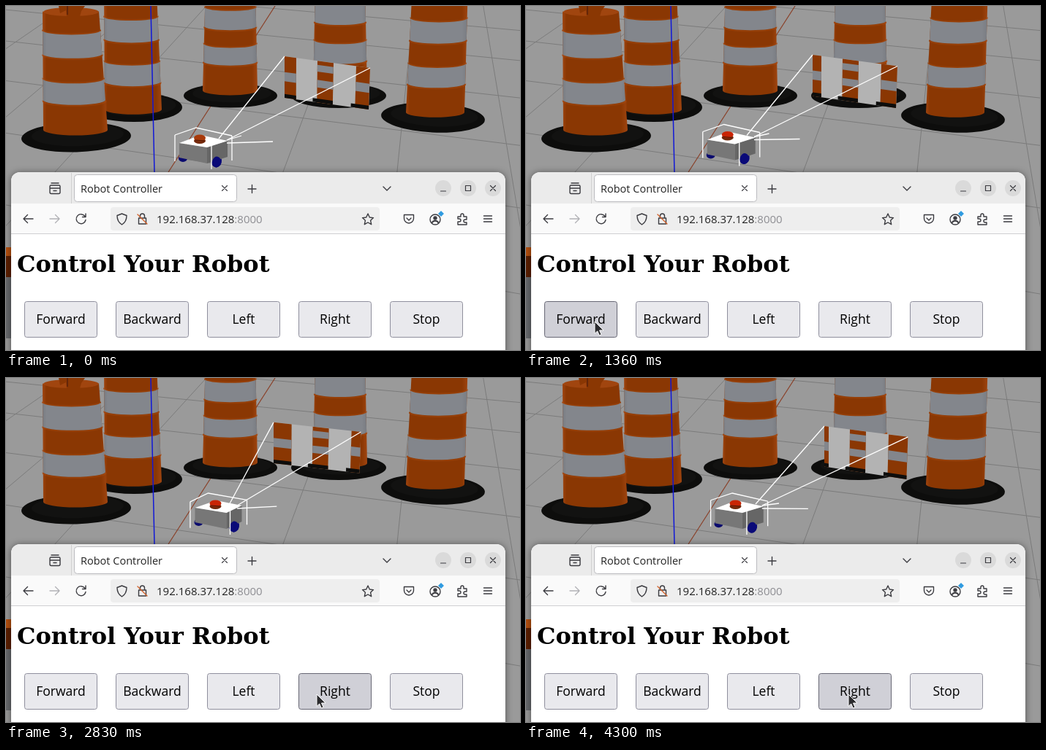
These frames come from a looping animation (703 px wide and 472 px high, 4.37 s). An HTML page with a canvas:

```html
<!DOCTYPE html>
<html lang="en">
<head>
<meta charset="utf-8">
<title>Robot Controller</title>
<style>
  html, body { margin: 0; width: 100%; height: 100%; overflow: hidden; background: #9a9a9a; }
  canvas, svg { position: absolute; left: 0; top: 0; }
  text { font-family: "Open Sans", "Noto Sans", sans-serif; fill: #222; }
  .title { font: bold 32px "DejaVu Serif", serif; fill: #000; }
  .window { filter: drop-shadow(0 1px 5px rgba(0, 0, 0, .5)); }
  .icon { fill: none; stroke: #3b3b40; stroke-width: 1.4; stroke-linecap: round; stroke-linejoin: round; }
  .btn rect { fill: #e9e9ed; stroke: #8f8f9d; }
  .btn.hover rect { fill: #d0d0d7; stroke: #676774; }
  .btn.press rect { fill: #b1b1b9; stroke: #484851; }
  .btn text { font-size: 17.5px; text-anchor: middle; fill: #000; }
</style>
</head>
<body>
<canvas id="ground" width="703" height="472"></canvas>
<canvas id="robot" width="703" height="472"></canvas>
<svg width="703" height="472" viewBox="0 0 703 472">
  <g class="window">
    <path d="M7 480V240a12 12 0 0 1 12-12H671a12 12 0 0 1 12 12V480z" fill="#fff"/>
  </g>
  <path d="M7 271V240a12 12 0 0 1 12-12H671a12 12 0 0 1 12 12V271z" fill="#ebebeb"/>
  <path d="M7 271H683V312H7z" fill="#fafafa"/>
  <path d="M7 312.5H683" stroke="#cfcfd2"/>
  <path d="M89.5 229V271" stroke="#cfcfcf"/>
  <rect x="93.5" y="231.5" width="222" height="37" rx="4" fill="#fff" stroke="#bcbcc0"/>
  <rect x="143" y="276" width="368" height="32" rx="4" fill="#eeeeee"/>
  <g fill="#dadada">
    <circle cx="598" cy="250" r="11"/><circle cx="632" cy="250" r="11"/><circle cx="666" cy="250" r="11"/>
  </g>
  <g class="icon">
    <path d="M62 243h10M60 247.500a1.500 1.500 0 0 1 1.500-1.500h11a1.500 1.500 0 0 1 1.500 1.500v8a2 2 0 0 1-2 2h-10a2 2 0 0 1-2-2zM60 250h14M65 253.500h4"/>
    <path d="M295.500 246.500l7 7m0-7l-7 7" stroke-width="1.1"/>
    <path d="M331 251h11m-5.500-5.500v11M516 248l5 5 5-5"/>
    <path d="M594.500 254h7M628.500 246.500h7v7h-7zM662.500 246.500l7 7m0-7l-7 7" stroke-width="1.2"/>
    <path d="M37 292H24m5.500-5.500L24 292l5.500 5.500"/>
    <path d="M60 292h13m-5.500-5.500L73 292l-5.500 5.500" stroke="#b2b2b6"/>
    <path d="M108 288.500a6.500 6.500 0 1 0 1 5M109 285v4.500h-4.500"/>
    <path d="M158.500 285l6.500 2.500c0 6-1.500 9.500-6.500 12.500-5-3-6.500-6.500-6.500-12.500z"/>
    <path d="M181.500 291h10v8h-10zM183.500 291v-3a3 3 0 0 1 6 0v3"/>
    <path d="M180 286l13 13" stroke="#d2622b"/>
    <path d="M495 285l2.300 5 5.200.6-3.900 3.700 1.100 5.400-4.700-2.700-4.700 2.700 1.100-5.400-3.900-3.700 5.200-.6z"/>
    <path d="M544.500 286.500h13v5a6.500 6.500 0 0 1-13 0zM548 291l3 3 3-3"/>
    <circle cx="587" cy="293" r="7"/>
    <path d="M583 297c1-3 7-3 8 0" stroke-width="2"/>
    <circle cx="587" cy="291" r="2" fill="#3b3b40"/>
    <path d="M618 289h4v-2a2 2 0 0 1 4 0v2h4v4h-2a2 2 0 0 0 0 4h2v3h-12v-4h2a2 2 0 0 0 0-4h-2z"/>
    <path d="M653.500 288h11m-11 4h11m-11 4h11"/>
  </g>
  <path d="M595 281l4 4-4 4-4-4z" fill="#309be0"/>
  <text x="102" y="256" font-size="14.5">Robot Controller</text>
  <text x="206" y="298" font-size="15">192.168.37.128<tspan fill="#8e8e93">:8000</tspan></text>
  <text class="title" x="15" y="365">Control Your Robot</text>
  <g id="buttons"></g>
  <path id="cursor" d="M0 0V16.500L3.700 13l2.600 6 2.800-1.200-2.600-5.800H12z" fill="#2b2b2e" stroke="#fff" stroke-width="1"/>
</svg>
<script>
const LOOP = 4370;
const WHITE = "#fff", ORANGE = "#8a3703", SILVER = "#83868c", BLACK = "#0d0d0c";
const ground = document.getElementById("ground").getContext("2d");
const ctx = document.getElementById("robot").getContext("2d");
const cursor = document.getElementById("cursor");

const mix = (a, b, k) => a + (b - a) * k;
const clamp = (v, lo, hi) => Math.min(hi, Math.max(lo, v));

// Linear track: rows of [time, ...values]
function track(rows, t) {
  if (t <= rows[0][0]) return rows[0].slice(1);
  for (let i = 1; i < rows.length; i++) {
    const a = rows[i - 1], b = rows[i];
    if (t < b[0]) return a.slice(1).map((v, j) => mix(v, b[j + 1], (t - a[0]) / (b[0] - a[0])));
  }
  return rows[rows.length - 1].slice(1);
}

function trace(c, pts) {
  c.beginPath();
  pts.forEach(([x, y], i) => i ? c.lineTo(x, y) : c.moveTo(x, y));
}
function poly(c, pts, fill) {
  trace(c, pts);
  c.closePath();
  c.fillStyle = fill;
  c.fill();
}
function line(c, pts, stroke, width = 1) {
  trace(c, pts);
  c.strokeStyle = stroke;
  c.lineWidth = width;
  c.stroke();
}
function oval(c, x, y, rx, ry, fill, turn = 0) {
  c.beginPath();
  c.ellipse(x, y, rx, ry, turn, 0, 7);
  c.fillStyle = fill;
  c.fill();
}

/* ---- static scene ---- */
function base(x, y, rx, ry, turn = 0) {
  oval(ground, x, y, rx, ry, BLACK, turn);
  oval(ground, x + 2, y - 3, rx * .84, ry * .74, "#121211", turn);
}

// Body from (l0..r0, y0) to (l1..r1, y1); bands are [top, bottom] pairs
function barrel(l0, r0, l1, r1, y0, y1, bands) {
  const arc = (y, grow, back) => {
    const k = (y - y0) / (y1 - y0);
    const l = mix(l0, l1, k) - grow, r = mix(r0, r1, k) + grow, rx = (r - l) / 2;
    const [from, to] = back ? [0, Math.PI] : [Math.PI, 0];
    ground.ellipse(l + rx, y, rx, rx * mix(.13, .17, k), 0, from, to, !back);
  };
  const ring = (a, b, grow, fill) => {
    ground.beginPath();
    arc(a, grow, false);
    arc(b, grow, true);
    ground.closePath();
    ground.fillStyle = fill;
    ground.fill();
  };
  const shade = (edge, mid) => {
    const g = ground.createLinearGradient(Math.min(l0, l1), 0, Math.max(r0, r1), 0);
    g.addColorStop(0, edge);
    g.addColorStop(.06, mid);
    g.addColorStop(.9, mid);
    g.addColorStop(1, edge);
    return g;
  };
  const lip = shade("#a84a12", "#963f08");
  ring(y0, y1, 0, shade("#a04510", ORANGE));
  for (const [a, b] of bands) {
    ring(a - 2, a, 1, lip);
    ring(b, b + 2, 1, lip);
    ring(a, b, 0, shade("#787b81", SILVER));
  }
}

function drawGround() {
  ground.fillStyle = "#9a9a9a";
  ground.fillRect(0, 0, 703, 472);
  // Two vanishing points shape the floor grid
  for (let k = -5; k < 7; k++) {
    const s = .269 * k - .64;
    if (k) line(ground, [[594 + s * 352, 0], [594 + s * 824, 472]], "#7b7b7b");
  }
  for (let i = 0; i < 9; i++) {
    const d = 1 / (.0034 - .0003 * i);
    line(ground, [[0, d - 352], [703, d * (1 + 703 / 3600) - 352]], "#7b7b7b");
  }
  line(ground, [[368, 0], [222, 228]], "#8a4028", 1.2);

  base(175, 139, 66, 20);
  barrel(134, 206, 135, 213, -20, 142, [[15, 45], [76, 104]]);
  line(ground, [[198, 0], [203, 228]], "#1018d8", 1.5);
  base(96, 180, 75, 20.5, -.03);
  barrel(50, 127, 51, 139, 7, 170, [[34, 66], [100, 129]]);
  oval(ground, 89, 8, 38, 6, "#a0450f");
  poly(ground, [[72, 0], [108, 0], [103, 7], [101, 14], [83, 14], [82, 6], [74, 10]], ORANGE);
  line(ground, [[84, 0], [84, 12]], "#64260a", 2);
  base(307, 123, 64, 16.5);
  barrel(273, 341, 269, 344, -30, 116, [[2, 28], [52, 76]]);
  base(455, 123, 65, 17);
  barrel(423, 491, 420, 494, -30, 117, [[-6, 21], [47, 74]]);
  base(584, 153, 71, 20.5, .05);
  barrel(556, 632, 547, 627, -30, 146, [[17, 46], [79, 106]]);

  // Slivers seen beside the window
  poly(ground, [[0, 331], [7, 331], [7, 343], [0, 343]], "#b5500f");
  poly(ground, [[0, 343], [7, 343], [7, 372], [0, 372]], "#5c1f02");
  poly(ground, [[0, 372], [7, 372], [7, 456], [0, 456]], "#686a6e");
}

/* ---- robot with its camera view ---- */
// go: 0..1 drive progress; yaw: sideways swing of the view in pixels
function drawView(go, yaw) {
  const tl = [381 + 22 * go + yaw, 69 - 4 * go - 6.2 * (1 - Math.exp(yaw / 33))];
  const tr = [498 + 20 * go + .88 * yaw, 85 - 5 * go + .163 * yaw];
  const br = [496 + 20 * go + .88 * yaw, 142 - 4 * go + .2 * yaw];
  const bl = [tl[0], 126 - 5 * go + .11 * yaw];
  const at = (u, v) => [0, 1].map(i => mix(mix(tl[i], tr[i], u), mix(bl[i], br[i], u), v));
  const patch = (u0, u1, v0, v1, fill) => {
    if (u1 > u0) poly(ctx, [at(u0, v0), at(u1, v0), at(u1, v1), at(u0, v1)], fill);
  };
  const width = tr[0] - tl[0];
  const shift = 16 - 8 * go - (yaw < 0 ? .45 : .4) * yaw;
  const edges = [-60, shift, shift + 29, shift + 51, shift + 82, 200].map(x => clamp(x / width, 0, 1));

  ctx.save();
  const hidden = clamp((366 - tl[0]) / 19, 0, 4) * 11;
  if (hidden) {
    const a = Math.max(421, 445 - hidden), b = Math.min(493, 445 + hidden);
    ctx.beginPath();
    ctx.rect(0, 0, a, 228);
    ctx.rect(b, 0, 703 - b, 228);
    ctx.clip();
  }
  patch(0, 1, 0, 1, "#b3b3b3");
  for (let i = 0; i < 5; i += 2) {
    const u0 = edges[i], u1 = edges[i + 1];
    // The middle barrel stands farther off, so two of its bands fit
    const bands = i === 2 ? [[.1, .26], [.46, .64]] : [[.38, .6]];
    patch(u0, u1, 0, 1, ORANGE);
    for (const [a, b] of bands) patch(u0, u1, a, b, SILVER);
    patch(clamp(u0 - .05, 0, 1), u1, .91, 1, BLACK);
  }
  ctx.restore();

  const apex = [291 + 22 * go + .2 * yaw, 182 - 9 * go];
  const side = [302 + 20 * go + .16 * yaw, 184 - 9 * go];
  return () => {
    line(ctx, [apex, tl], WHITE, 1.3);
    line(ctx, [side, tr], WHITE, 1.3);
    line(ctx, [[side[0], side[1] + 4], [365 + 19 * go + .37 * yaw, 186 - 7 * go + .08 * yaw]], WHITE, 1.3);
    if (yaw > -30) line(ctx, [side, [322 + 21 * go + .6 * yaw, 178 - 6 * go]], WHITE, 1.3);
  };
}

function drawRobot(go, yaw) {
  ctx.clearRect(0, 0, 703, 472);
  const rays = drawView(go, yaw);
  const k = -yaw / 37;
  ctx.save();
  ctx.translate(21.5 * go, -9 * go);

  const p = [231 - k * .6, 177 + k * 1.8], q = [260 - k * 5, 167], r = [309 - k, 178 - k * 1.7], s = [281 + k * 4, 188];
  const down = ([x, y], h) => [x, y + h];
  line(ctx, [p, q, r], WHITE, 1.3);
  oval(ctx, 242, 209 - k * 2, 6, 5, "#0a0a6e");
  oval(ctx, 288 + k * 2.5, 213 - k, 7, 8.5, "#0a0a78", .2);

  const a = [237, 188 - k], b = [266, 177], c = [303 - k * 2, 185 - k], d = [275 + k * 5, 194];
  poly(ctx, [a, d, down(d, 22), down(a, 20)], "#777");
  poly(ctx, [d, c, down(c, 22), down(d, 22)], "#666");
  poly(ctx, [a, b, c, d], WHITE);
  oval(ctx, 288 + k * 2.5, 214 - k, 6, 7.5, "#0a0a78", .2);
  oval(ctx, 265, 185, 8, 4, "#74290b");
  oval(ctx, 265, 181, 8, 4.5, go > .1 ? "#c92505" : "#a83a0a");
  line(ctx, [[259, 184], [271, 185]], "#4a1605");

  line(ctx, [down(p, 36), p], WHITE, 1.3);
  line(ctx, [r, down(r, 34)], WHITE, 1.3);
  line(ctx, [s, down(s, 36)], WHITE, 1.3);
  ctx.restore();
  rays();
}

/* ---- controls ---- */
const buttons = ["Forward", "Backward", "Left", "Right", "Stop"].map((label, i) => {
  const g = document.createElementNS("http://www.w3.org/2000/svg", "g");
  const x = 25 + 125 * i;
  g.innerHTML = `<rect x="${x + .5}" y="405.500" width="99" height="49" rx="3"/><text x="${x + 50}" y="436">${label}</text>`;
  document.getElementById("buttons").append(g);
  return { g, x };
});

const MOUSE = [
  [0, 80, 476], [140, 80, 471], [470, 82, 457], [540, 85, 436], [740, 86, 430], [900, 94, 433],
  [1700, 94, 433], [1920, 283, 436], [2050, 300, 434], [2540, 300, 434], [2760, 425, 434],
  [2850, 425, 434], [3100, 441, 434]
];
const DRIVE = [[0, 0], [740, .04], [840, .05], [1360, .5], [1920, 1]];
const TURN = [[2430, 0], [2830, -37], [3380, -92], [3740, -55], [4300, 5]];
const PRESSES = [[810, 900], [2400, 2490], [3310, 3430]];
const LAG = 70;

function drawControls(t) {
  const [x, y] = track(MOUSE, t);
  cursor.setAttribute("transform", `translate(${Math.round(x)} ${Math.round(y)})`);
  const [hx, hy] = track(MOUSE, t - LAG);
  const down = PRESSES.some(([a, b]) => t >= a && t < b);
  for (const b of buttons) {
    const over = hx >= b.x && hx < b.x + 100 && hy >= 405 && hy < 455;
    b.g.setAttribute("class", "btn" + (over ? down ? " press" : " hover" : ""));
  }
}

function stepped(t) {
  const snap = (from, size) => from + Math.floor((t - from) / size + .001) * size;
  if (t < 740) return snap(0, 740 / 11);
  if (t < 790) return 740;
  return t < 1150 ? snap(790, 72) : snap(1150, 70);
}

function render(now) {
  const t = stepped(now % LOOP);
  drawRobot(track(DRIVE, t)[0], track(TURN, t)[0]);
  drawControls(t);
}

const start = performance.now();
function tick() {
  render(performance.now() - start);
  requestAnimationFrame(tick);
}
drawGround();
tick();
</script>
</body>
</html>
```
